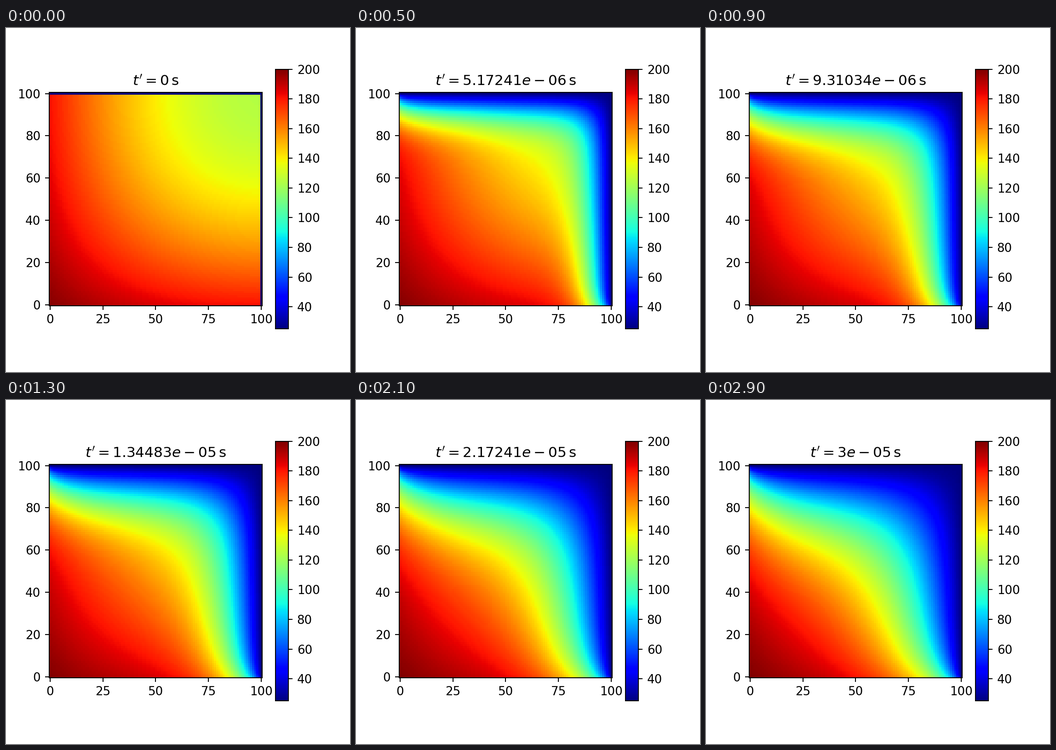
Animation of 748x748 px, one loop 3000 ms. Source, as a matplotlib script:

```python
import numpy as np
import matplotlib.pyplot as plt
from matplotlib.animation import FuncAnimation

FRAMES = 30
INTERVAL = 100
T_END = 3e-5

N = 101                  # grid nodes per side
COLD, HOT = 25.0, 207.0  # quenched edges, hot surroundings
VMAX = 200.0
BETA = 1.25              # decay mode of the preheated plate
PEAK = 0.673             # remaining deficit at the far corner, per axis
FILM = BETA * np.tan(BETA) / (N - 1)  # heat transfer per cell at left and bottom
SPREAD = 17.5            # diffusion per frame in cells squared
SUBSTEPS = 80


def quench(temp):
    """Hold the top and right edges at the cold temperature."""
    temp[-1, :] = COLD
    temp[:, -1] = COLD
    return temp


def preheated():
    pos = np.arange(N) / (N - 1)
    deficit = PEAK * np.cos(BETA * (1 - pos))
    return HOT - (HOT - COLD) * np.outer(deficit, deficit)


def diffuse(temp):
    """Advance one explicit step; left and bottom exchange heat with HOT."""
    g = np.pad(temp, 1, mode="reflect")
    g[0, 1:-1] += 2 * FILM * (HOT - temp[0])
    g[1:-1, 0] += 2 * FILM * (HOT - temp[:, 0])
    lap = g[2:, 1:-1] + g[:-2, 1:-1] + g[1:-1, 2:] + g[1:-1, :-2] - 4 * temp
    return quench(temp + SPREAD / SUBSTEPS * lap)


def simulate():
    temp = quench(preheated())
    fields = [temp]
    for _ in range(FRAMES - 1):
        for _ in range(SUBSTEPS):
            temp = diffuse(temp)
        fields.append(temp)
    return fields


def title_at(i):
    t = T_END * i / (FRAMES - 1)
    return rf"$t' = {t:g}\,\mathrm{{s}}$"


fields = simulate()

fig, ax = plt.subplots(figsize=(4, 4), dpi=187)
fig.subplots_adjust(left=0.125, right=0.9, bottom=0.125, top=0.88)
image = ax.imshow(fields[0], cmap="jet", origin="lower", vmin=COLD, vmax=VMAX)
ax.set_xticks(range(0, 101, 25))
ax.set_yticks(range(0, 101, 20))
title = ax.set_title(title_at(0))
bar = fig.colorbar(image, ax=ax)
bar.set_ticks(range(40, 201, 20))


def draw(i):
    image.set_data(fields[i])
    title.set_text(title_at(i))
    return image, title


anim = FuncAnimation(fig, draw, frames=FRAMES, interval=INTERVAL,
                     repeat=True, repeat_delay=0, blit=False)
plt.show()
```
